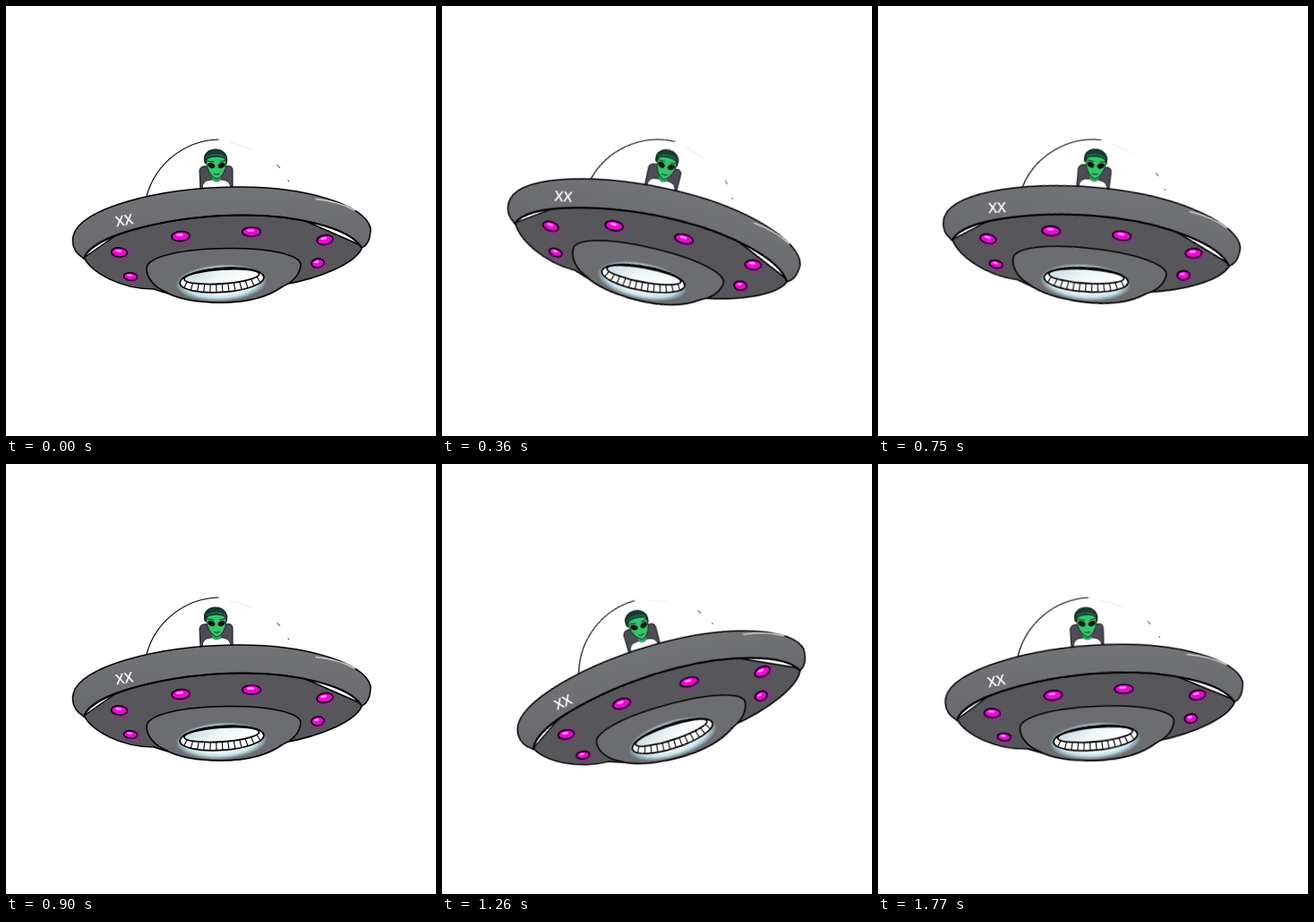
Write an HTML page that moves like this. It is 480 px wide and 480 px high and loops after 1800 ms.

```html
<!DOCTYPE html>
<html lang="en">
<head>
<meta charset="utf-8">
<title>Rocking saucer</title>
<style>
  html, body { margin: 0; width: 100%; height: 100%; overflow: hidden; background: #fff; }
  svg { display: block; width: 100vw; height: 100vh; }
  #ship { transform-origin: 240px 240px; }
  text { font: 16px "Open Sans", "Noto Sans", sans-serif; font-weight: 600; }
</style>
</head>
<body>
<svg viewBox="0 0 480 480" fill="none" stroke-linecap="round" stroke-linejoin="round">
  <defs>
    <linearGradient id="rim" x1="0" y1="0" x2="0" y2="1">
      <stop offset="0" stop-color="#737478"/>
      <stop offset="1" stop-color="#68696d"/>
    </linearGradient>
    <linearGradient id="lens" x1="0" y1="0" x2="1" y2="0.3">
      <stop offset="0" stop-color="#c3d6da"/>
      <stop offset="0.55" stop-color="#eef6f8"/>
      <stop offset="1" stop-color="#fff"/>
    </linearGradient>
    <radialGradient id="beam">
      <stop offset="0.6" stop-color="#f2fbff"/>
      <stop offset="0.8" stop-color="#c4dde5"/>
      <stop offset="0.93" stop-color="#86a0aa" stop-opacity="0.8"/>
      <stop offset="1" stop-color="#6c6d71" stop-opacity="0"/>
    </radialGradient>
    <radialGradient id="halo">
      <stop offset="0.5" stop-color="#c010b0" stop-opacity="0.6"/>
      <stop offset="1" stop-color="#c010b0" stop-opacity="0"/>
    </radialGradient>
  </defs>

  <g id="ship">
    <!-- dome -->
    <path d="M157 212A86 86 0 0 1 237 149" stroke="#000" stroke-width="1.2"/>
    <path d="M251 153Q264 155 275 161" stroke="#f1f1f1" stroke-width="1.5"/>
    <path d="M303 177.5L305.5 180.5M315 194.5L315.5 195.5" stroke="#222"/>

    <!-- pilot -->
    <g stroke="#111" stroke-width="1">
      <path d="M217 204L216 184Q217 178 224 179L246 179Q252 177 253 183L253 204Z" fill="#4c4c54"/>
      <path d="M219 204Q219 194 229 194L242 194Q251 195 251 204Z" fill="#fff" stroke-width="0.8"/>
      <path d="M231 188L230 194Q235 199 240 194L239 188Z" fill="#27a85b" stroke="none"/>
      <path d="M222 175C219 165 226 160 234 160C243 160 249 167 246 176Z" fill="#143d34"/>
      <path d="M224 171C229 167 241 167 245 171C248 180 241 192 235.5 193C230 192 222 181 224 171Z" fill="#35c56c" stroke-width="0.8"/>
    </g>
    <path d="M224 169Q234 163 245 169" stroke="#2d6b5c" stroke-width="1.3"/>
    <path d="M225 173L232 174M239 174L244.5 172.5" stroke="#123a2b" stroke-width="1.1"/>
    <ellipse rx="4.2" ry="2.8" transform="translate(229.3 178) rotate(28)" fill="#081109"/>
    <ellipse rx="4.2" ry="2.8" transform="translate(240.6 178) rotate(-28)" fill="#081109"/>
    <path d="M232.5 187.5Q235.5 189 238 187.3" stroke="#0d4d27" stroke-width="1.2"/>

    <!-- hull -->
    <path d="M87 281C96 298 128 316 165 316C195 326 215 331 241 331C268 331 290 325 310 311C350 304 393 287 398 268L300 225L160 230Z"
      fill="#56565b" stroke="#000" stroke-width="1.5"/>
    <path d="M87 282C77 276 73 267 75 257C81 226 170 203 255 202C334 201 401 222 407 248C407 260 404 267 397 270C384 247 322 233 262 233.5C187 234 95 255 87 282Z"
      fill="url(#rim)" stroke="#000" stroke-width="1.5"/>
    <path d="M87 282C95 255 187 234 262 233.5C322 233 384 247 397 270" stroke="#000" stroke-width="2"/>
    <path d="M346 215.5Q371 218 389 228" stroke="#ccc" stroke-width="1.6"/>

    <!-- underside -->
    <path d="M157 293C157 279 199 271 248 270.5C296 270 329 278 329 289C328 300 320 308 309 313C291 326 267 331 241 331C214 331 191 327 178 319C166 314 157 304 157 293Z"
      fill="#6c6d71" stroke="#000" stroke-width="1.6"/>
    <ellipse cx="240.5" cy="309" rx="52" ry="21" fill="url(#beam)" transform="rotate(-3 240 309)"/>
    <g id="hatch" transform="translate(241 306) rotate(-4)" stroke="#000">
      <ellipse rx="47" ry="13.5" fill="#fff" stroke-width="1.7"/>
      <path d="M-47 0A47 13.5 0 0 1 47 0A42 12 0 0 0 -47 0Z" fill="#111" stroke-width="0.8"/>
      <ellipse cy="-4" rx="42" ry="8" fill="url(#lens)" stroke-width="1.8"/>
    </g>

    <g id="lamps"></g>
    <text transform="translate(132 239) rotate(-10)" y="5.8" text-anchor="middle" fill="#fff">XX</text>
  </g>
</svg>
<script>
  const NS = "http://www.w3.org/2000/svg";
  const add = (parent, tag, attrs) => {
    const el = document.createElementNS(NS, tag);
    for (const key in attrs) el.setAttribute(key, attrs[key]);
    return parent.appendChild(el);
  };

  // x, y, rx, ry, tilt
  const lamps = [
    [126.5, 275, 9, 5, 5],
    [195, 257, 10, 5.3, -4],
    [274, 252, 10.3, 5, 0],
    [356, 261, 9, 5.3, -10],
    [139, 302, 7.5, 4.2, 5],
    [348, 287, 7, 5, -8]
  ];
  for (const [x, y, rx, ry, tilt] of lamps) {
    const g = add(document.getElementById("lamps"), "g", {
      transform: `translate(${x} ${y}) rotate(${tilt})`
    });
    add(g, "ellipse", { cx: 1.5, cy: 1.5, rx: rx + 4, ry: ry + 4, fill: "url(#halo)" });
    add(g, "ellipse", { rx, ry, fill: "#f304dc", stroke: "#000", "stroke-width": 1.7 });
    add(g, "ellipse", { cx: -1, cy: -ry * 0.3, rx: rx * 0.4, ry: ry * 0.25, fill: "#ff9cf4" });
  }

  const hatch = document.getElementById("hatch");
  const teeth = 13;
  for (let i = 0; i < teeth; i++) {
    const c = -0.93 + 1.86 * i / (teeth - 1);
    const s = Math.sqrt(1 - c * c);
    add(hatch, "path", { d: `M${42 * c} ${8 * s - 4}L${45.5 * c} ${13.5 * s}`, "stroke-width": 1.1 });
  }

  // Sine rocking, held for 30 ms per pose.
  const poses = 60, swing = 15;
  const frames = Array.from({ length: poses + 1 }, (_, i) => ({
    transform: `rotate(${swing * Math.sin(2 * Math.PI * i / poses)}deg)`,
    easing: "step-end"
  }));
  document.getElementById("ship").animate(frames, { duration: 1800, iterations: Infinity });
</script>
</body>
</html>
```
